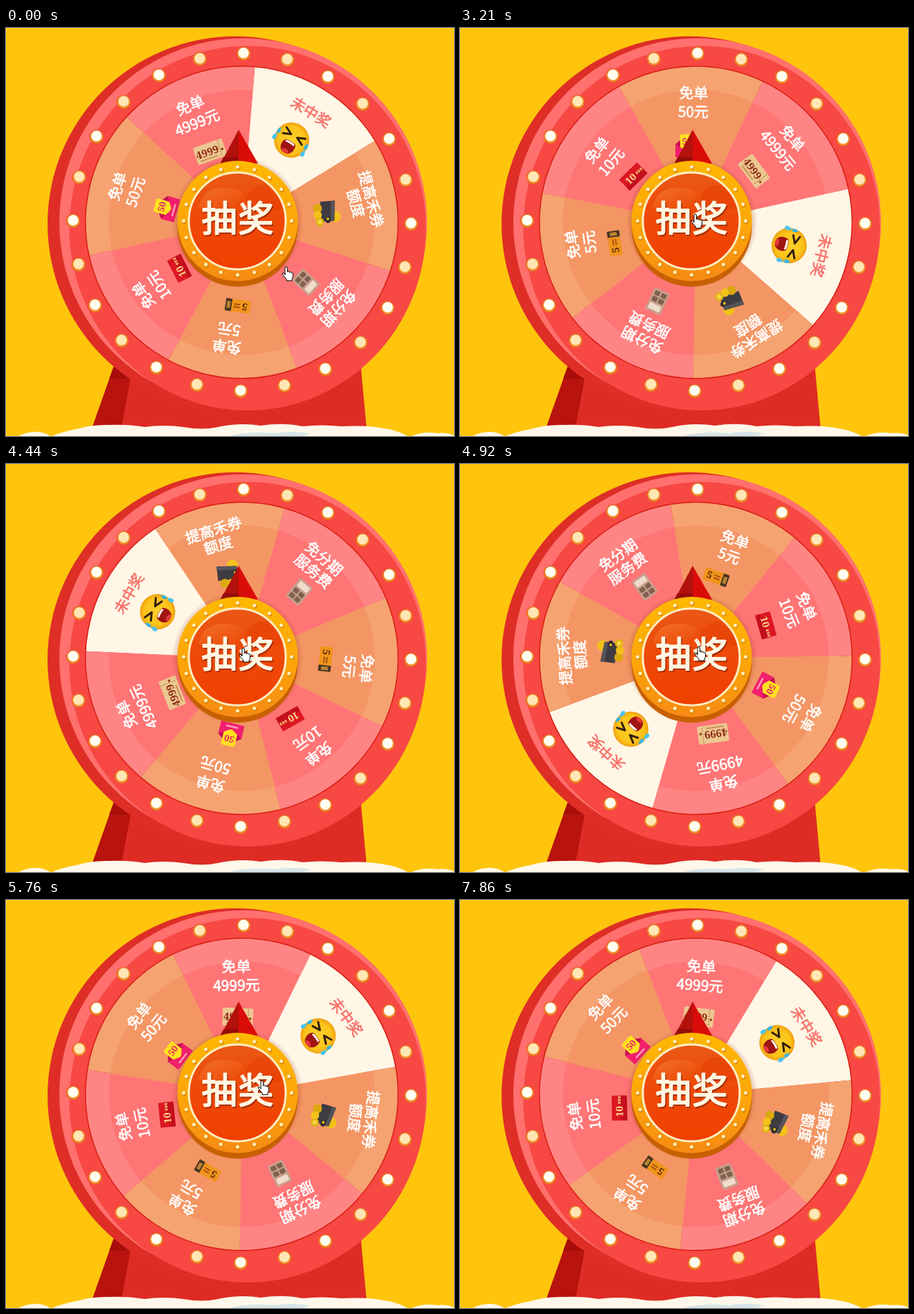
These frames come from a looping animation (647x590 px, 8480 ms). An HTML page:

```html
<!DOCTYPE html>
<html lang="zh-CN">
<head>
<meta charset="utf-8">
<title>抽奖</title>
<style>
  html, body { margin: 0; width: 100%; height: 100%; overflow: hidden; background: #ffc50c; }
  svg { display: block; width: 647px; height: 590px; }
  text { font-family: "Noto Sans CJK SC", "Noto Sans CJK", sans-serif; text-anchor: middle; }
  .label { font-size: 21px; stroke-width: .7px; }
  .title { font-size: 51px; letter-spacing: 2px; stroke-width: 2px; stroke-linejoin: round; }
  .serif { font-family: "Noto Serif", serif; font-weight: 700; }
</style>
</head>
<body>
<svg viewBox="0 0 647 590">
  <defs>
    <linearGradient id="gold" x2="0" y2="1">
      <stop stop-color="#ffb800"/><stop offset=".55" stop-color="#fda50a"/><stop offset="1" stop-color="#f68a14"/>
    </linearGradient>
    <linearGradient id="button" x2="0" y2="1">
      <stop stop-color="#ea5817"/><stop offset=".4" stop-color="#ee4a08"/><stop offset="1" stop-color="#f14000"/>
    </linearGradient>
    <linearGradient id="gloss" x2="1" y2="1">
      <stop stop-color="#f58a3c" stop-opacity=".6"/><stop offset="1" stop-color="#f05a14" stop-opacity=".1"/>
    </linearGradient>
    <radialGradient id="face">
      <stop stop-color="#ffd02c"/><stop offset=".75" stop-color="#fcc31a"/><stop offset="1" stop-color="#f0a010"/>
    </radialGradient>
    <radialGradient id="halo">
      <stop offset=".65" stop-color="#f5a030"/><stop offset=".88" stop-color="#ea6a28"/><stop offset="1" stop-color="#f04a30" stop-opacity="0"/>
    </radialGradient>
    <radialGradient id="shade">
      <stop offset=".88" stop-color="#8a3010" stop-opacity=".32"/><stop offset="1" stop-color="#8a3010" stop-opacity="0"/>
    </radialGradient>
  </defs>

  <rect width="647" height="590" fill="#ffc50c"/>
  <path d="M159 480L123 582H521L512 484Z" fill="#de2c25"/>
  <path d="M159 480L123 582H166L183 490Z" fill="#b8130d"/>
  <path d="M157 486L149 507H180L183 486Z" fill="#a80d0a"/>
  <g fill="#fff8ea">
    <path d="M18 590Q32 583 46 584Q56 585 64 590Z"/>
    <path d="M66 590Q84 583 102 580Q124 573 150 574Q176 573 200 577Q228 573 256 577Q284 582 306 577Q338 570 368 575Q400 570 428 576Q456 573 484 576Q518 574 546 579Q566 582 580 590Z"/>
    <path d="M586 590Q604 583 622 586Q636 584 647 589V590Z"/>
  </g>
  <path d="M326 589Q352 583 388 586Q410 582 440 586L428 590H326Z" fill="#d6e6e8"/>

  <circle cx="331" cy="283" r="271" fill="#de2e26"/>
  <ellipse cx="342.5" cy="281" rx="265.5" ry="266" fill="#ff706e"/>
  <ellipse cx="349" cy="289.5" rx="257.5" ry="263.5" fill="#f74843"/>
  <g id="bulbs"></g>

  <circle cx="340.5" cy="281" r="226.5" fill="#d81e14"/>
  <g id="wheel"></g>

  <circle cx="334.5" cy="281" r="95" fill="url(#shade)"/>
  <path d="M336 147L310 196H336Z" fill="#b3110b"/>
  <path d="M336 147L364 196H336Z" fill="#da0c0a"/>
  <path d="M314 187H336V197H309Z" fill="#960d0c"/>

  <circle cx="334.5" cy="287" r="87" fill="#c86002"/>
  <circle cx="334.5" cy="279" r="87" fill="url(#gold)"/>
  <g id="studs"></g>
  <circle cx="334" cy="279" r="70" fill="url(#button)" stroke="#ffeec4" stroke-width="3"/>
  <path d="M278 260Q284 232 312 231Q340 231 342 240Q338 254 318 262Q300 268 278 260Z" fill="url(#gloss)"/>
  <path d="M346 250Q352 228 374 227Q394 240 400 262Q376 262 346 250Z" fill="#e23a00" opacity=".45"/>
  <text class="title" x="337" y="296" fill="#a52c04" stroke="#a52c04">抽奖</text>
  <text class="title" x="335.500" y="294" fill="#fff6e2" stroke="#fff6e2">抽奖</text>

  <g id="cursor" fill="#fff" stroke="#000" stroke-linejoin="round">
    <path id="hand" d="M5 13V3a1.7 1.7 0 0 1 3.4 0V9a1.5 1.5 0 0 1 3 .5a1.5 1.5 0 0 1 2.8.7a1.3 1.3 0 0 1 2.3 1V15q0 2-1.5 4V21.4H7V19Q4 15.5 1.3 12.3Q.4 10.6 2 10.2Q3.4 10.2 5 13Z"/>
    <path id="arrow" d="M.5.5V16.5L4.2 13L6.7 18.6L9 17.6L6.6 12.1H11.6Z"/>
  </g>
</svg>
<script>
const LOOP = 8480;
const $ = id => document.getElementById(id);
const polar = (deg, r) => {
  const a = deg * Math.PI / 180;
  return [r * Math.sin(a), -r * Math.cos(a)].map(v => +v.toFixed(2));
};
const ring = (n, draw) => Array.from({ length: n }, (_, i) => draw(i)).join('');
const rect = (x, y, w, h, fill, r = 0) =>
  `<rect x="${x}" y="${y}" width="${w}" height="${h}" rx="${r}" fill="${fill}"/>`;
const disc = (x, y, r, fill) => `<circle cx="${x}" cy="${y}" r="${r}" fill="${fill}"/>`;
const path = (d, fill) => `<path d="${d}" fill="${fill}"/>`;

$('bulbs').innerHTML = ring(24, i => {
  const [x, y] = polar(i * 15 + .5, 244);
  return disc(341 + x, 281 + y, 11, 'url(#halo)') +
    disc(341 + x, 280 + y, 7.6, i % 2 ? '#ffe6b4' : '#fffdf0');
});
$('studs').innerHTML = ring(20, i => {
  const [x, y] = polar(i * 18, 78);
  return disc(335.3 + x, 280.3 + y, 3, '#dc8204') + disc(334.5 + x, 279 + y, 2.5, '#fff0b8');
});

const tear = x => path(`M${x} -8q-5 8 0 10q5 -2 0 -10Z`, '#35b5e8') +
  path(`M${x * 1.04} 2q-6 9 0 11q6 -2 0 -11Z`, '#4cc4f0');
const icons = {
  face: disc(0, 0, 25.5, 'url(#face)') +
    '<path d="M-16 -12L-5 -7L-16 -2M16 -12L5 -7L16 -2" fill="none" stroke="#33200c" stroke-width="3" stroke-linecap="round" stroke-linejoin="round"/>' +
    path('M-8 3Q0 1 8 3Q11 7 10 13Q8 21 0 21Q-8 21 -10 13Q-11 7 -8 3Z', '#a01414') +
    path('M-7 3.500Q0 1.500 7 3.500V6Q0 5 -7 6Z', '#fff') +
    path('M-6 18Q0 12 6 18Q3 21 0 21Q-3 21 -6 18Z', '#e8383a') +
    tear(-23) + tear(23),
  wallet: disc(8, -11, 8, '#f2c21a') + path('M-15 -13L14 -9L13 10L-16 8Z', '#3d3c42') +
    path('M-15 -13L14 -9V-4L-15 -7Z', '#56545a') + rect(7, -3, 9, 6, '#2a292e', 2) +
    disc(10, 0, 2, '#e8bd20') + disc(-7, 13, 6.5, '#dba90e') + disc(3, 14, 6, '#f2c21a') +
    disc(13, 12, 6, '#e3b414') + disc(13, 12, 3, '#f8d84a'),
  calculator: rect(-12, -17, 24, 34, '#c89f8c', 3) + rect(-9, -14, 18, 9, '#f0dccd', 1) +
    [-9, 1].map(x => [-2, 7].map(y => rect(x, y, 8, 7, '#80604f', 1)).join('')).join(''),
  ticket: rect(-18, -9, 36, 18, '#f0941c', 1) + rect(9, -9, 9, 18, '#493524', 1) +
    rect(11, -5, 5, 10, '#b98532') + rect(-3, -3, 9, 2, '#a8540c') + rect(-3, 1, 9, 2, '#a8540c') +
    '<text class="serif" x="-10" y="5" font-size="14" fill="#5c2a08">5</text>',
  card: rect(-18, -11, 36, 22, '#dc1723', 1) + path('M-18 4L18 -2V11H-18Z', '#c40f1d') +
    '<text class="serif" x="-5" y="5" font-size="14" fill="#ffd98c">10</text>' +
    [6, 10, 14].map(x => rect(x, -2, 3, 4, '#f5a56a')).join(''),
  envelope: path('M-17 -3L0 -16L17 -3V16H-17Z', '#c3104f') + rect(-10, -17, 20, 24, '#ffe11f', 3) +
    '<text class="serif" y="-2" font-size="13" fill="#e8256a">50</text>' +
    path('M-17 -3L0 8L17 -3V16H-17Z', '#f21f6c') + rect(-9, 10, 18, 2.5, '#ff9cc0'),
  coupon: rect(-22, -13, 44, 26, '#ecc78f', 2) +
    '<text class="serif" x="-4" y="5" font-size="15" fill="#8c2414">4999</text>' +
    rect(-17, 8, 26, 2, '#c99358') +
    '<path d="M15 -12V12" stroke="#9c5c2c" stroke-dasharray="2 2"/>' + disc(18, 2, 1.8, '#9c3c1c'),
};

// Angles are measured clockwise from the start of the white sector.
const sectors = [
  { from: 0, lines: ['未中奖'], at: 27.3, r: 188, tilt: 27, icon: 'face', iconAt: 26.4, iconR: 139, iconTilt: 27 },
  { from: 53.7, lines: ['提高禾券', '额度'], at: 75, r: 190, tilt: 70, gap: 23, icon: 'wallet', iconAt: 78.3, iconR: 124, iconTilt: 78 },
  { from: 103.4, lines: ['免分期', '服务费'], at: 126.9, r: 187, tilt: 128, gap: 24, icon: 'calculator', iconAt: 128.3, iconR: 127, iconTilt: 128 },
  { from: 154.6, lines: ['免单', '5元'], at: 182.2, r: 181, tilt: 184, gap: 25, icon: 'ticket', iconAt: 177.9, iconR: 121, iconTilt: 184 },
  { from: 203.2, lines: ['免单', '10元'], at: 228.6, r: 177, tilt: 232, gap: 27, icon: 'card', iconAt: 228.7, iconR: 112, iconTilt: 238 },
  { from: 253, lines: ['免单', '50元'], at: 281.4, r: 187, tilt: 283, gap: 27, icon: 'envelope', iconAt: 276, iconR: 111, iconTilt: 281 },
  { from: 307.7, lines: ['免单', '4999元'], at: 331.4, r: 185, tilt: 333, gap: 27, icon: 'coupon', iconAt: 331, iconR: 112, iconTilt: 336 },
];
const white = ['#fff6e6', '#fff6e6'], orange = ['#f5a371', '#f49664'], pink = ['#ff8585', '#ff7575'];
const wedge = (a, b, r, fill) =>
  path(`M0 0L${polar(a, r)}A${r} ${r} 0 0 1 ${polar(b, r)}Z`, fill);
const place = (a, r, tilt, body) =>
  `<g transform="rotate(${a}) translate(0 ${-r}) rotate(${tilt - a})">${body}</g>`;

$('wheel').innerHTML = sectors.map((s, i) => {
  const to = i < 6 ? sectors[i + 1].from : 360;
  const [outer, inner] = !i ? white : i % 2 ? orange : pink;
  const ink = i ? '#fff' : '#f8736c';
  const text = s.lines.map((line, n) =>
    `<text class="label" y="${7.8 + (n && n * s.gap)}" fill="${ink}" stroke="${ink}">${line}</text>`).join('');
  return wedge(s.from, to, 225, outer) + wedge(s.from, to, 192, inner) +
    place(s.at, s.r, s.tilt, text) + place(s.iconAt, s.iconR, s.iconTilt, icons[s.icon]);
}).join('');

// The picture moves only at these moments.
const ticks = [0, 280, 400, 550, 700, 820, 970, 1090, 1210, 1360, 2320, 2440, 2590,
  3210, 3330, 3450, 3600, 3750, 3870, 3990, 4140, 4290, 4440, 4560, 4680, 4800, 4920,
  5040, 5160, 5310, 5460, 5610, 5760, 5910, 6030, 6180, 6330, 6450, 6570, 6720, 6840,
  6960, 7080, 7200, 7350, 7470, 7590, 7740, 7860];
const spin = [[3090, 4.8], [3210, 77.6], [3750, 487.9], [4440, 992.6], [4920, 1276.1],
  [5760, 1466.1], [6030, 1471.1]];
const moves = [[0, 398, 344], [400, 371, 322], [550, 361, 312], [820, 337, 284], [1210, 329, 275],
  [1360, 329, 272], [2440, 332, 268], [2590, 333, 268], [3750, 333, 268], [4440, 336, 265],
  [4920, 338, 263], [5760, 363, 260], [6180, 395, 267], [6570, 449, 295], [7200, 472, 323],
  [7590, 579, 539], [7740, 579, 571], [7860, 579, 592]];

const segment = (keys, t) => {
  let i = 0;
  while (i < keys.length - 2 && t >= keys[i + 1][0]) i++;
  const [a, b] = [keys[i][0], keys[i + 1][0]];
  return [i, Math.min(1, Math.max(0, (t - a) / (b - a))), b - a];
};
const rate = i => (spin[i + 1][1] - spin[i][1]) / (spin[i + 1][0] - spin[i][0]);
const slope = i => {
  if (i === 0) return rate(0);
  if (i === spin.length - 1) return 0;
  const [a, b] = [rate(i - 1), rate(i)];
  return 2 * a * b / (a + b);
};
const angle = t => {
  const [i, u, span] = segment(spin, t);
  const [y0, y1] = [spin[i][1], spin[i + 1][1]];
  const ease = u * u * (3 - 2 * u);
  return y0 + (y1 - y0) * ease + span * u * (1 - u) * (slope(i) * (1 - u) - slope(i + 1) * u);
};

const begin = performance.now();
function draw() {
  const now = (performance.now() - begin) % LOOP;
  const t = ticks.filter(k => k <= now).pop() || 0;
  $('wheel').setAttribute('transform', `translate(340.5 281) rotate(${angle(t)})`);
  const [i, u] = segment(moves, t);
  const [x, y] = [1, 2].map(n => Math.round(moves[i][n] + (moves[i + 1][n] - moves[i][n]) * u));
  $('cursor').setAttribute('transform', `translate(${x} ${y})`);
  const over = x < 420;
  $('hand').setAttribute('visibility', over ? 'visible' : 'hidden');
  $('arrow').setAttribute('visibility', over ? 'hidden' : 'visible');
  requestAnimationFrame(draw);
}
draw();
</script>
</body>
</html>
```
